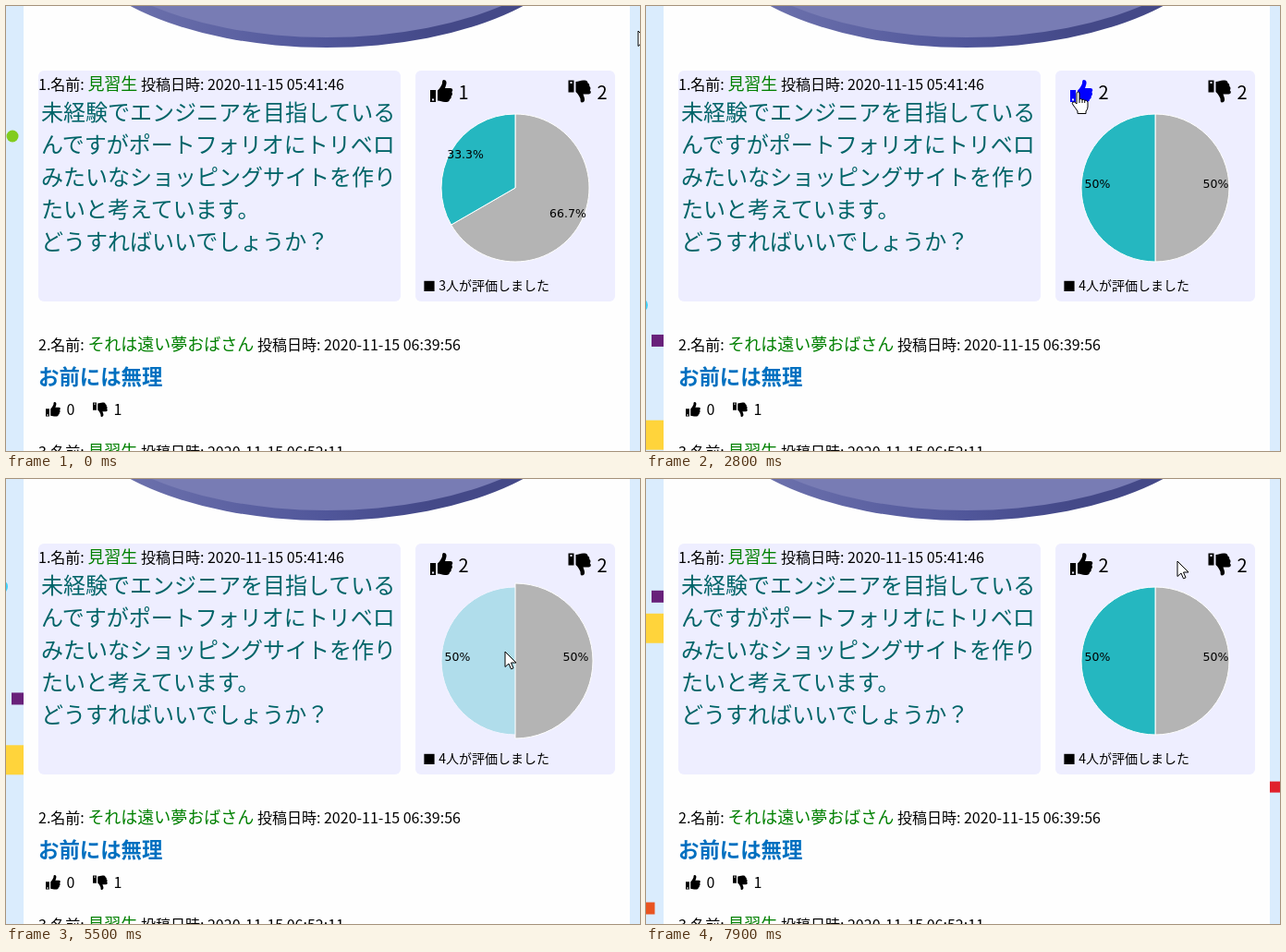
An HTML page for the animation above (8000 ms loop, 686x482 px).

```html
<!DOCTYPE html>
<html lang="ja">
<meta charset="utf-8">
<style>
  html, body { margin: 0; width: 100%; height: 100%; overflow: hidden }
  svg { display: block; font: 16px "Noto Sans CJK JP", "Noto Sans CJK", sans-serif }
  .name { font-size: 18px; fill: #008000 }
  .post { font-size: 24px; fill: #006468 }
  .reply { font-size: 22.4px; font-weight: bold; fill: #0070c0 }
  .count { font-size: 20px }
  .note { font-size: 14px }
  .label { font: 12.5px "DejaVu Sans", sans-serif; text-anchor: middle }
  .slice { stroke: #fff }
  .cursor { fill: #fff; stroke: #000; stroke-linejoin: round }
</style>
<svg width="686" height="482" viewBox="0 0 686 482">
  <defs>
    <linearGradient id="rim">
      <stop offset=".15" stop-color="#6a6fab"/>
      <stop offset=".5" stop-color="#50569a"/>
      <stop offset=".7" stop-color="#444988"/>
    </linearGradient>
    <path id="thumb" fill-rule="evenodd" d="M0 11H6V24H0ZM2 20.5V22.5H4V20.5Z
      M8 11.5C11 9 12 6 13 4C13 1 13.5 0 14.5 0C18 0 18 3.5 17 6L16 9H22C24.5 9 25 12 23.3 13
      C24.5 15 24 17 22.8 17.5C23 19.5 22 21 21 21C21 23.5 19 24 16 24C13 24 11 22.5 8 22.5Z"/>
  </defs>
  <rect width="686" height="482" fill="#daecfd"/>
  <g id="marks"></g>
  <rect x="19" width="656" height="482" fill="#fefefe"/>
  <ellipse cx="347" cy="-90" rx="285" ry="135" fill="url(#rim)"/>
  <ellipse cx="347" cy="-101" rx="285" ry="135" fill="#787cb4"/>
  <g fill="#eef">
    <rect x="35" y="70" width="392" height="250" rx="6"/>
    <rect x="443" y="70" width="216" height="250" rx="6"/>
  </g>
  <g id="posts"></g>
  <text class="reply" x="35" y="410">お前には無理</text>

  <use id="like" href="#thumb" x="459" y="80"/>
  <use href="#thumb" transform="translate(608.5 104.5) scale(1 -1)"/>
  <text id="likes" class="count" x="489.5" y="101"></text>
  <text class="count" x="639.5" y="101">2</text>
  <use href="#thumb" transform="translate(43 429) scale(.65)"/>
  <use href="#thumb" transform="translate(94 445) scale(.65 -.65)"/>
  <text x="65.5" y="443">0</text>
  <text x="116.5" y="443">1</text>

  <path id="gray" class="slice" fill="#b4b4b4"/>
  <path id="teal" class="slice" fill="#25b7c0"/>
  <text id="grayLabel" class="label"></text>
  <text id="tealLabel" class="label"></text>
  <text id="note" class="note" x="451" y="308"></text>

  <path id="arrow" class="cursor" d="M0 0V16.5L4 13L6.5 18.8L9 17.8L6.5 12H12Z"/>
  <path id="hand" class="cursor" d="M-1 13V2Q-1 0 .5 0T2 2V8Q3.5 7 5 8.5Q6.5 7.7 7.7 9.2Q10 8.5 11 11V16
    Q11 19 9 21V23.5H0V21Q-2 18 -5 14Q-6.5 12 -5 11T-1 13ZM2 8V12M5 8.5V12M7.7 9.2V12"/>
</svg>
<script>
const LOOP = 8, CX = 551, CY = 197;
const $ = id => document.getElementById(id);
const set = (el, attrs) => { for (const k in attrs) el.setAttribute(k, attrs[k]); };

// x centre, y at start, upward speed, half size, colour, corner radius
const marks = [
  [7, 141, 72, 6.5, '#82cc1e', 6.5],
  [-6, 539, 76.8, 8, '#3fd0f8', 8],
  [12.5, 491.5, 46.1, 6.5, '#68217a', 0],
  [3, 631, 59.4, 16, '#ffd43b', 0],
  [681, 934, 76, 6, '#e0202c', 0],
  [3, 939, 60, 6.5, '#e95420', 0]
].map(([x, y, speed, half, fill, rx]) => {
  const el = document.createElementNS('http://www.w3.org/2000/svg', 'rect');
  set(el, { x: x - half, width: 2 * half, height: 2 * half, fill, rx });
  $('marks').append(el);
  return { el, y: y - half, speed };
});

const header = (y, n, name, time) => `<text x="35" y="${y}">${n}.名前: <tspan class="name">${name}</tspan> 投稿日時: 2020-11-15 ${time}</text>`;
$('posts').innerHTML =
  header(91, 1, '見習生', '05:41:46') +
  header(373, 2, 'それは遠い夢おばさん', '06:39:56') +
  header(489, 3, '見習生', '06:52:11') +
  ['未経験でエンジニアを目指している', 'んですがポートフォリオにトリベロ', 'みたいなショッピングサイトを作り',
    'たいと考えています。', 'どうすればいいでしょうか？']
    .map((s, i) => `<text class="post" x="38" y="${124 + 35 * i}">${s}</text>`).join('');

// pointer path: time, x, y
const route = [
  [0, 684, 27], [.1, 652, 27], [.5, 571, 38], [1.2, 571, 38], [1.4, 527, 32], [1.7, 461, 48],
  [2.2, 467, 93], [2.9, 467, 93], [3.3, 485, 115], [3.6, 490, 125], [4.2, 545, 185], [4.4, 570, 196],
  [4.6, 570, 196], [4.9, 530, 190], [5.2, 572, 196], [5.4, 558, 190], [5.5, 540, 187],
  [5.9, 485, 130], [6.2, 473, 102], [7.4, 473, 102], [7.9, 575, 89]
];

function pointer(t) {
  const i = Math.max(1, route.findIndex(p => p[0] >= t));
  const [t0, x0, y0] = route[i - 1], [t1, x1, y1] = route[i];
  const k = (t - t0) / (t1 - t0);
  return [x0 + (x1 - x0) * k, y0 + (y1 - y0) * k];
}

// angles in turns, clockwise from the top
function slice(id, from, to, hovered) {
  const r = hovered === id ? 84 : 80;
  const at = a => `${CX + r * Math.sin(a * 2 * Math.PI)} ${CY - r * Math.cos(a * 2 * Math.PI)}`;
  set($(id), {
    d: `M${CX} ${CY}L${at(from)}A${r} ${r} 0 ${+(to - from > .5)} 1 ${at(to)}Z`,
    opacity: hovered && hovered !== id ? .3 : 1
  });
  const mid = (from + to) * Math.PI, label = $(id + 'Label');
  set(label, { x: CX + 1.5 + 64 * Math.sin(mid), y: CY - 64 * Math.cos(mid) });
  label.textContent = +((to - from) * 100).toFixed(1) + '%';
}

function draw(t) {
  for (const m of marks) set(m.el, { y: m.y - m.speed * t });

  const [x, y] = pointer(t);
  const onLike = x > 458 && x < 484 && y > 79 && y < 106;
  for (const id of ['arrow', 'hand'])
    set($(id), { transform: `translate(${x} ${y})`, visibility: (id === 'hand') === onLike ? 'visible' : 'hidden' });
  set($('like'), { fill: onLike ? '#00f' : '#000' });

  const liked = t >= 2.8 && t < 6.5 || t >= 7.4;
  const up = liked ? 2 : 1, total = up + 2;
  $('likes').textContent = up;
  $('note').textContent = `■ ${total}人が評価しました`;

  // the chart reacts one step late
  const [px, py] = pointer(Math.max(0, t - .1));
  const hovered = Math.hypot(px - CX, py - CY) < 80 && (px > CX ? 'gray' : 'teal');
  slice('gray', 0, 2 / total, hovered);
  slice('teal', 2 / total, 1, hovered);
}

const start = performance.now();
(function tick() {
  const t = (performance.now() - start) / 1000 % LOOP;
  draw(Math.floor(t * 10) / 10);
  requestAnimationFrame(tick);
})();
</script>
</html>
```
